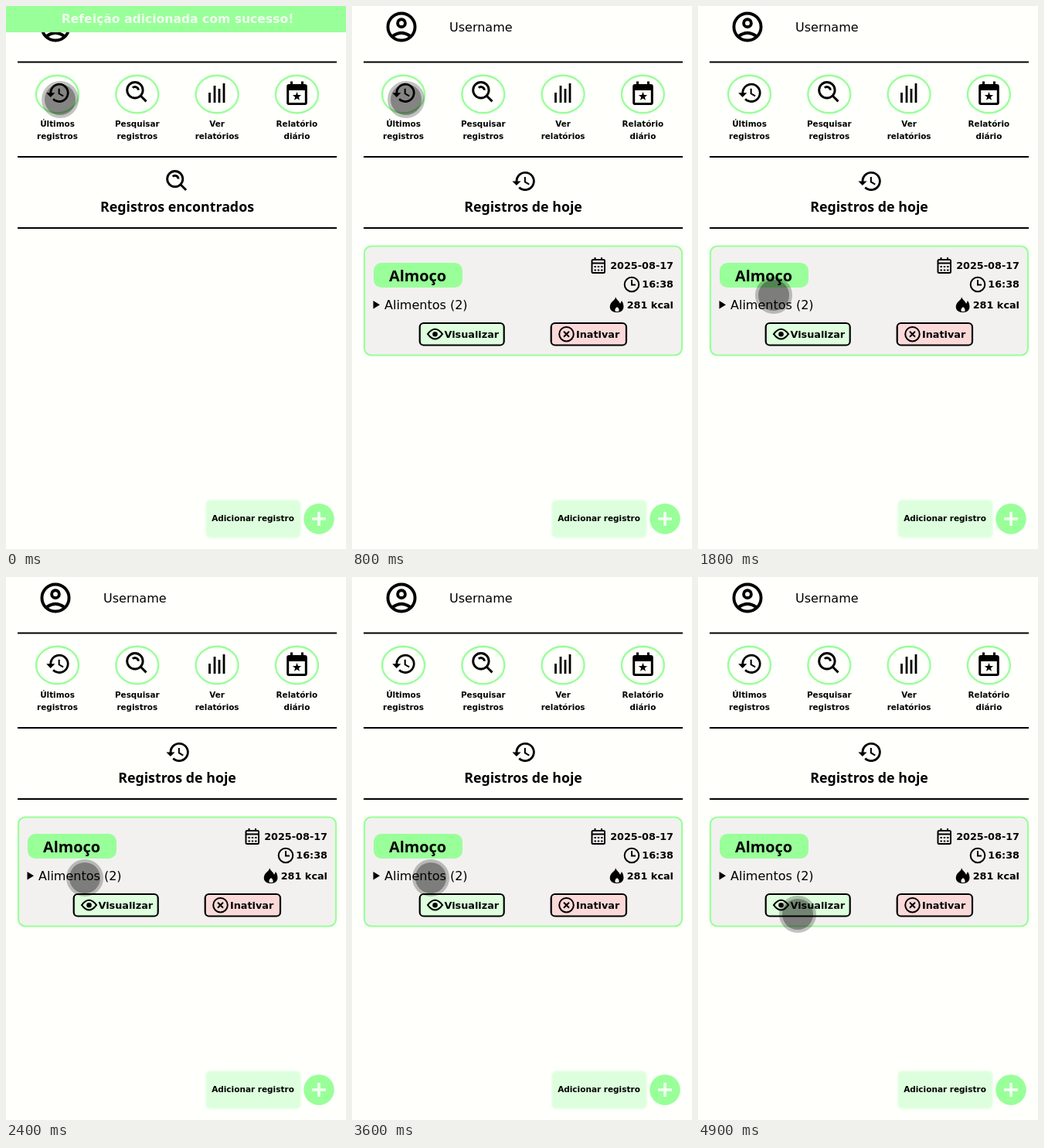
Recreate the animation shown at these times as an HTML page. Size 440 by 702 pixels, loop 5000 ms.

```html
<!DOCTYPE html>
<html lang="pt-BR">
<head>
<meta charset="utf-8">
<title>Registros</title>
<style>
  html, body { margin: 0; width: 100%; height: 100%; overflow: hidden; background: #fffffc; }
  svg { display: block; width: 440px; height: 702px; }
  text { font-family: "DejaVu Sans", Verdana, sans-serif; font-size: 16px; }
  .label { font-size: 10.4px; font-weight: bold; text-anchor: middle; }
  .strong { font-size: 12.8px; font-weight: bold; }
  .end { text-anchor: end; }
  .food { font-size: 12.5px; }
  .title { font: bold 17.8px "Noto Sans", "Open Sans", sans-serif; text-anchor: middle; }
  .meal { font: 600 19.8px "Noto Sans", "Open Sans", sans-serif; text-anchor: middle; }
  .line { fill: none; stroke: #000; stroke-width: 2; }
</style>
</head>
<body>
<svg viewBox="0 0 440 702">
  <defs>
    <path id="history" d="M13 3a9 9 0 0 0-9 9H1l3.9 4L9 12H6a7 7 0 1 1 2.06 4.94l-1.42 1.42A9 9 0 1 0 13 3zm-1 5v5l4.28 2.54.72-1.21-3.5-2.08V8z"/>
    <g id="search" class="line">
      <circle cx="10" cy="10" r="7"/>
      <path d="M15.1 15.1L20 20M7.9 7.9A3 3 0 0 1 13 10"/>
    </g>
    <filter id="soft" x="-10%" y="-20%" width="120%" height="140%"><feGaussianBlur stdDeviation=".8"/></filter>
  </defs>
  <rect width="440" height="702" fill="#fffffc"/>

  <g class="line" transform="translate(40.6 3.6) scale(1.95)">
    <circle cx="12" cy="12" r="9"/>
    <circle cx="12" cy="9.5" r="2.5"/>
    <path d="M6.2 18.1Q12 13.9 17.8 18.1"/>
  </g>
  <text x="126" y="33">Username</text>
  <path class="line" d="M15 72.5H428M15 195H428M15 287H428"/>

  <g id="menu"></g>
  <use href="#history" transform="translate(50.8 95.5) scale(1.4)"/>
  <use href="#search" transform="translate(152.3 94.2) scale(1.46)"/>
  <path class="line" style="stroke-width:2.8" d="M263.5 125V112M270 125V103M276 125V107M282 125V100"/>
  <g transform="translate(376.5 113)">
    <rect class="line" x="-11.8" y="-10.5" width="23.6" height="24" rx="1.5" style="stroke-width:3"/>
    <path d="M-12-11H12V-4H-12zM-8.5-15.5h3v5h-3zM5.5-15.5h3v5h-3z"/>
    <path id="star"/>
  </g>

  <g id="found">
    <use href="#search" transform="translate(204.3 209.2) scale(1.44)"/>
    <text class="title" x="221.5" y="266">Registros encontrados</text>
  </g>

  <g id="today">
    <use href="#history" transform="translate(206 209.7) scale(1.4)"/>
    <text class="title" x="221.5" y="266">Registros de hoje</text>
    <rect id="card" x="16" y="310.5" width="411" height="141" rx="9" fill="#f2f1f0" stroke="#9f9" stroke-width="2.2"/>
    <rect x="28" y="332" width="115" height="32" rx="10" fill="#9f9"/>
    <text class="meal" x="85" y="355.5">Almoço</text>

    <g class="line">
      <rect x="310.5" y="328" width="16.5" height="17" rx="1.5"/>
      <path d="M314.5 325v4M323 325v4M310 332.5h17"/>
      <path d="M313.5 337h11M313.5 341.5h11" stroke-dasharray="2.4 1.9"/>
      <circle cx="362" cy="360" r="9.3"/>
      <path d="M362 354v6.5h5"/>
    </g>
    <text class="strong end" x="416" y="340">2025-08-17</text>
    <text class="strong end" x="416" y="364">16:38</text>

    <g id="energy">
      <path d="M341 376c1 4 5 5 6 9l2-4c4 6 4 15-6 15-10 0-11-8-7-13 3-3 5-4 5-7z"/>
      <path d="M343 389q4 3 2 6h-4q-2-3 2-6z" fill="#f2f1f0"/>
      <text class="strong end" x="416" y="391">281 kcal</text>
    </g>

    <path id="marker"/>
    <text x="42" y="392">Alimentos (2)</text>
    <g id="foods">
      <text class="food" x="27" y="415">&gt; Refrigerante Nivo Zuna Original</text>
      <text class="food" x="27" y="439">Garrafa 2l &gt; Pizza Congelada de</text>
      <text class="food" x="27" y="462">Calabresa Moída Tavurbão</text>
    </g>

    <g id="actions">
      <rect x="87.7" y="410" width="109" height="28.5" rx="5" fill="#dfd" stroke="#000" stroke-width="2.2"/>
      <path class="line" d="M98 424.2Q107.500 411.500 117 424.2Q107.500 437 98 424.2z"/>
      <circle cx="107.500" cy="424.2" r="3.3"/>
      <text class="strong" x="119.500" y="429">Visualizar</text>
      <rect x="257.700" y="410" width="97.300" height="28.5" rx="5" fill="#fbd9d9" stroke="#000" stroke-width="2.2"/>
      <circle class="line" cx="277.500" cy="424.2" r="9.3"/>
      <path class="line" d="M274 420.7l7 7m0-7l-7 7"/>
      <text class="strong" x="290" y="429">Inativar</text>
    </g>
  </g>

  <rect x="258.5" y="638.5" width="123" height="49" rx="6" fill="#dfd" filter="url(#soft)"/>
  <text class="label" x="319.5" y="666" style="font-size:10.5px">Adicionar registro</text>
  <circle cx="405" cy="663" r="19.8" fill="#9f9"/>
  <path d="M396 663h18M405 654v18" stroke="#f4fff4" stroke-width="3.6"/>

  <g id="banner">
    <rect width="440" height="34" fill="#9f9"/>
    <text x="222" y="22" fill="#f0fff0" text-anchor="middle" style="font-size:15.6px;font-weight:bold">Refeição adicionada com sucesso!</text>
  </g>

  <g id="pointer">
    <circle r="24" fill-opacity=".24"/>
    <circle r="20" fill-opacity=".32"/>
  </g>
</svg>
<script>
  const $ = id => document.getElementById(id);
  const LOOP = 5000, STEP = 100;

  // time, x, y of the touch point
  const path = [
    [0, 70, 121], [1000, 70, 121], [1100, 71, 124], [1200, 72, 133], [1300, 74, 155],
    [1400, 77, 195], [1500, 80, 250], [1600, 86, 312], [1700, 93, 352], [1800, 98, 374],
    [1900, 101, 384], [2100, 102, 389], [4100, 102, 389], [4200, 104, 393], [4300, 108, 402],
    [4400, 117, 417], [4500, 124, 428], [4600, 128, 434], [4700, 129, 436], [5000, 129, 436]
  ];

  const menu = [['Últimos', 'registros'], ['Pesquisar', 'registros'], ['Ver', 'relatórios'], ['Relatório', 'diário']];
  $('menu').innerHTML = menu.map(([top, bottom], i) => {
    const x = 66.5 + i * 103.3;
    return `<ellipse cx="${x}" cy="114" rx="27.5" ry="24.300" fill="none" stroke="#9f9" stroke-width="2.4"/>
      <text class="label" x="${x}" y="156">${top}</text><text class="label" x="${x}" y="172">${bottom}</text>`;
  }).join('');

  const star = Array.from({ length: 10 }, (_, i) => {
    const r = i % 2 ? 2.4 : 6, a = i * Math.PI / 5;
    return `${r * Math.sin(a)} ${4 - r * Math.cos(a)}`;
  });
  $('star').setAttribute('d', `M${star.join('L')}z`);

  const show = (id, on) => { $(id).style.display = on ? '' : 'none'; };
  const move = (id, x, y) => $(id).setAttribute('transform', `translate(${x} ${y})`);

  function place(t) {
    const i = path.findIndex(p => p[0] > t);
    const [t0, x0, y0] = path[i - 1], [t1, x1, y1] = path[i];
    const k = (t - t0) / (t1 - t0);
    move('pointer', x0 + (x1 - x0) * k, y0 + (y1 - y0) * k);
  }

  function draw(t) {
    const listed = t >= 100, open = t >= 2500 && t < 3600;
    show('found', !listed);
    show('today', listed);
    show('foods', open);
    $('banner').setAttribute('opacity', Math.max(0, Math.min(1, (400 - t) / 400)));
    $('card').setAttribute('height', open ? 211.5 : 141);
    $('marker').setAttribute('d', open ? 'M27.5 382h10.5l-5.2 8.500z' : 'M27.5 381v10.5l8.500-5.2z');
    move('energy', 0, open ? 35 : 0);
    move('actions', 0, open ? 70 : 0);
    place(t);
  }

  const start = performance.now();
  function tick() {
    const t = performance.now() - start + 15;
    draw(Math.floor(t % LOOP / STEP) * STEP);
    requestAnimationFrame(tick);
  }
  tick();
</script>
</body>
</html>
```
